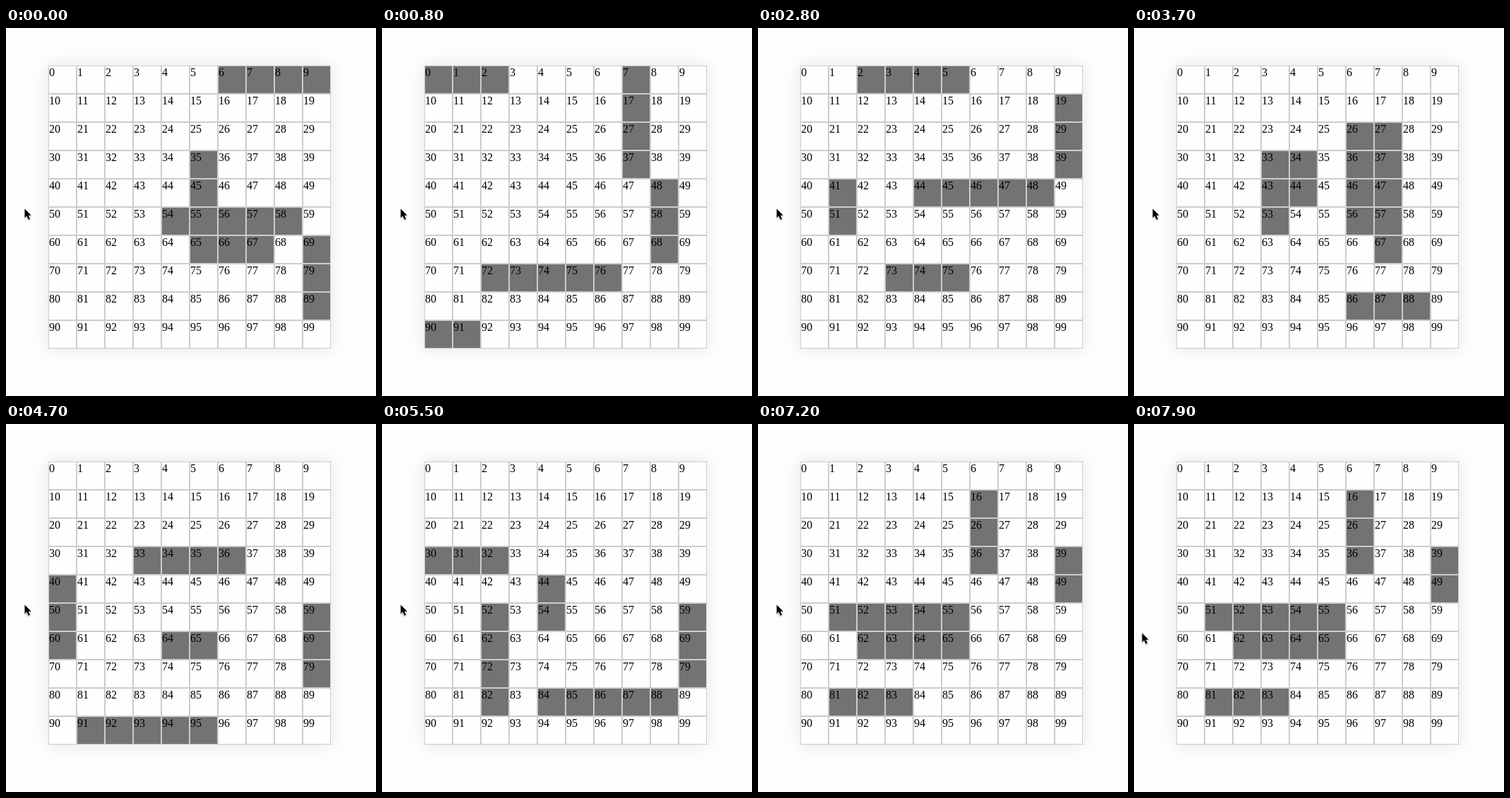
Animation, 524 px wide and 520 px high, one loop 8 s. Source, as an HTML page:

```html
<!DOCTYPE html>
<html lang="en">
<head>
<meta charset="utf-8">
<title>Ship placement</title>
<style>
  html, body { margin: 0; width: 100%; height: 100%; overflow: hidden; background: #fdfdfd; }
  #board {
    position: absolute; left: 60px; top: 53px; width: 400px; height: 400px;
    display: grid; grid-template: repeat(10, 40px) / repeat(10, 40px);
    box-shadow: 0 0 20px rgba(0, 0, 0, .1);
    font: 16px/18px "Liberation Serif", Times, serif; color: #000;
  }
  #board div { box-sizing: border-box; border: 1px solid #ccc; background: #fefefe; }
  #board .ship { background: #737373; }
  #cursor {
    position: absolute; left: 24px; top: 253px; overflow: visible;
    filter: drop-shadow(0 1px 1px rgba(0, 0, 0, .3));
  }
</style>
</head>
<body>
<div id="board"></div>
<svg id="cursor" width="16" height="22">
  <path d="M2.5 2.5V15.2L5.4 12.5L7.7 17.8L10 16.8L7.8 11.7H11.7Z"
        fill="#000" stroke="#fff" stroke-width="1" paint-order="stroke"/>
</svg>
<script>
  const LOOP = 8000, CURSOR_MOVE = 7900;

  // Each ship: first cell, direction (h or v), length.
  const layouts = [
    [0, '6h4 35v2 54h5 65h3 69v3'],
    [800, '0h3 7v4 48v3 72h5 90h2'],
    [1900, '11v3 22h3 26h2 54h4 75h5'],
    [2800, '2h4 19v3 41v2 44h5 73h3'],
    [3700, '26v4 27v5 33v3 34v2 86h3'],
    [4700, '33h4 40v3 59v3 64h2 91h5'],
    [5500, '30h3 44v2 52v4 59v3 84h5'],
    [6400, '4h3 33v5 54v2 60v3 90h4'],
    [7200, '16v3 39v2 51h5 62h4 81h3']
  ].map(([start, ships]) => ({ start, filled: cellsOf(ships) }));

  const board = document.getElementById('board');
  const cursor = document.getElementById('cursor');
  const cells = Array.from({ length: 100 }, (_, i) => {
    const cell = document.createElement('div');
    cell.textContent = i;
    return board.appendChild(cell);
  });
  let shown;

  function cellsOf(ships) {
    const filled = new Set();
    for (const [, first, dir, length] of ships.matchAll(/(\d+)([hv])(\d)/g)) {
      const step = dir === 'h' ? 1 : 10;
      for (let k = 0; k < +length; k++) filled.add(+first + k * step);
    }
    return filled;
  }

  function draw() {
    const t = performance.now() % LOOP;
    const layout = layouts.filter(l => l.start <= t).pop();
    if (layout !== shown) {
      cells.forEach((cell, i) => cell.classList.toggle('ship', layout.filled.has(i)));
      shown = layout;
    }
    cursor.style.transform = t < CURSOR_MOVE ? 'none' : 'translate(-15px, 40px)';
    requestAnimationFrame(draw);
  }
  draw();
</script>
</body>
</html>
```
